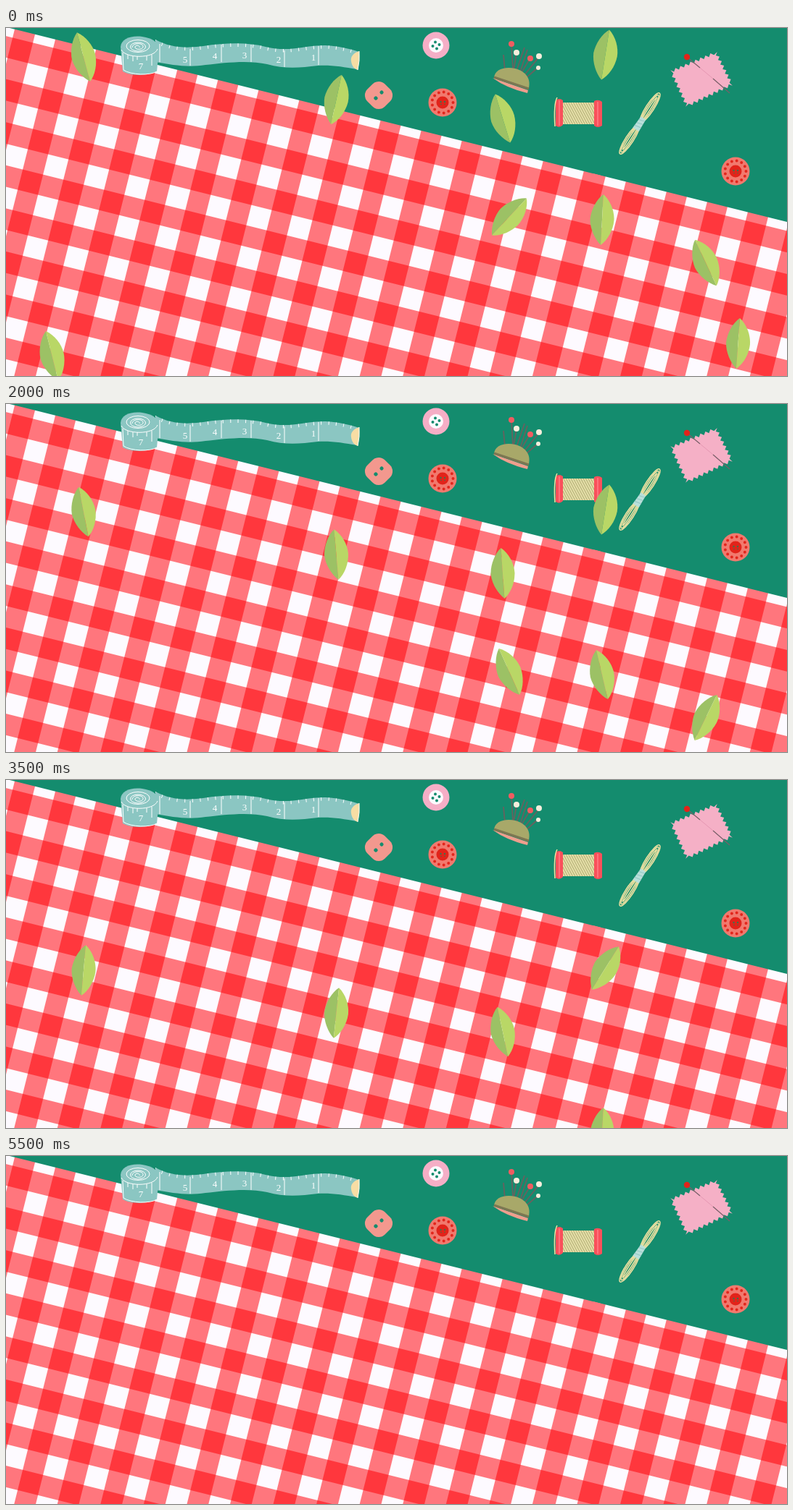
Write an HTML page that moves like this. It is 1077x481 px and loops after 6500 ms.

```html
<!DOCTYPE html>
<html lang="en">
<head>
<meta charset="utf-8">
<title>Sewing table with falling leaves</title>
<style>
  html, body { margin: 0; width: 100%; height: 100%; overflow: hidden; background: #148c6e; }
  svg { display: block; width: 100%; height: 100%; }
  .line { fill: none; stroke: #fff; stroke-width: 1; }
  .numbers { font: 13px "Liberation Serif", "Noto Serif", serif; fill: #fff; text-anchor: middle; }
  .thread { fill: none; stroke: #f3e3a3; stroke-width: 1.5; }
  .needle { fill: none; stroke: #66625f; stroke-width: 1.8; }
</style>
</head>
<body>
<svg viewBox="0 0 1077 481">
  <defs>
    <pattern id="gingham" width="57.78" height="57.78" patternUnits="userSpaceOnUse"
             patternTransform="translate(7.2 12)">
      <rect width="57.78" height="57.78" fill="#ff767d"/>
      <rect width="28.89" height="28.89" fill="#ff373d"/>
      <rect x="28.89" y="28.89" width="28.89" height="28.89" fill="#fdfaff"/>
    </pattern>
    <pattern id="twill" width="3" height="3" patternUnits="userSpaceOnUse" patternTransform="rotate(-28)">
      <rect width="3" height="3" fill="#e6dfa9"/>
      <rect width="1" height="3" fill="#b1ae74"/>
    </pattern>
    <path id="ribbon" d="M206 16C228 28 250 28 272 25C305 20 335 20 358 26C392 34 410 24 440 24C460 25 475 29 487 33L484 57C465 54 450 51 430 52C405 55 385 57 360 50C335 44 300 48 275 51C250 55 230 51 206 47Z"/>
    <clipPath id="ribbonClip"><use href="#ribbon"/></clipPath>
    <g id="leaf">
      <path d="M0-35C-9-28-16-13-16.5 0C-16 13-9 27 0 35Z" fill="#9cc165"/>
      <path d="M0-35C10-27 16.5-13 16.5 0C16 14 9 28 0 35Z" fill="#b9d766"/>
    </g>
    <g id="redButton">
      <circle r="19.5" fill="#f1796e"/>
      <circle r="14.5" fill="none" stroke="#e2261c" stroke-width="4" stroke-linecap="round"
              pathLength="13" stroke-dasharray="0 1"/>
      <circle r="8.5" fill="#e2231a"/>
      <g fill="#39764f">
        <circle cx="-2.5" cy="-1" r="1.2"/><circle cx="3" cy="-1" r="1.2"/>
        <circle cx="-2" cy="2.5" r=".8"/><circle cx="3" cy="2.5" r=".8"/>
      </g>
    </g>
  </defs>

  <rect width="1077" height="481" fill="#148c6e"/>

  <!-- Two widths of cloth joined by a seam -->
  <g transform="translate(5 0) rotate(14.04)" fill="url(#gingham)">
    <rect x="-20" width="860" height="500"/>
    <rect x="828" width="372" height="500" transform="translate(2 0)"/>
  </g>

  <g id="tape">
    <use href="#ribbon" fill="#8bc6c2"/>
    <path d="M206 16C228 28 250 28 272 25C305 20 335 20 358 26C392 34 410 24 440 24C460 25 475 29 487 33"
          clip-path="url(#ribbonClip)" fill="none" stroke="#fff" stroke-width="9" stroke-dasharray="1 9.5"/>
    <path d="M487 32C478 35 475 40 476 46C477 53 480 56 485 58Q488 45 487 32Z" fill="#f7dda4"/>
    <path d="M487 32Q488 45 485 58" class="line"/>
    <path d="M158 26C159 15 172 10 188 12C202 14 210 20 211 28L208 60C194 67 171 66 161 60Z" fill="#8bc6c2"/>
    <g class="line">
      <path d="M159 30C164 42 204 43 209 29M161 34L162 58C172 65 199 66 208 60"/>
      <ellipse cx="182" cy="25" rx="16" ry="8.5"/>
      <ellipse cx="182" cy="26" rx="10.5" ry="6"/>
      <path d="M174 27C174 20 190 20 189 26C188 31 177 30 178 26C179 23 185 24 184 27"/>
      <path d="M168 37V43M175 39V46M181 39V44M194 39V45M201 37V52M212 22V47M254 29V52M297 23V47M338 23V47M384 31V54M431 25V51"/>
    </g>
    <g class="numbers" id="numbers"><text x="186" y="57">7</text></g>
  </g>

  <g transform="translate(593 24)">
    <circle r="18.5" fill="#f5aec6"/>
    <circle r="10" fill="#fdfaff"/>
    <g fill="#148c6e">
      <circle cx="-1" cy="-4.5" r="2"/><circle cx="4.5" cy="-1" r="2"/>
      <circle cx="-4.5" cy="1" r="2"/><circle cx="1" cy="4.5" r="2"/>
    </g>
  </g>
  <g transform="translate(514 93) rotate(45)">
    <rect x="-17" y="-17" width="34" height="34" rx="12" fill="#f3988e"/>
    <g fill="#148c6e"><circle cy="5.7" r="2.6"/><circle cy="-5.7" r="2.6"/></g>
  </g>
  <use href="#redButton" x="602" y="103"/>
  <use href="#redButton" x="1006" y="198"/>

  <g id="cushion">
    <path class="needle" d="M697 23L699 56M704 35L700 58M686 37L688 59M715 27L704 59M719 30L709 61M722 43L709 65M735 40L714 66M733 55L716 70"/>
    <path d="M673 70C673 57 688 53 702 56C717 60 724 70 721 83Q698 76 673 70Z" fill="#a8a869"/>
    <path d="M671 69L720 86L719 90Q690 83 671 69Z" fill="#ee9e8d"/>
    <path d="M673 68L721 84" stroke="#7c7752" stroke-width="3"/>
    <g fill="#f15c61"><circle cx="697" cy="22" r="4"/><circle cx="723" cy="42" r="4"/></g>
    <g fill="#f6eedc"><circle cx="704" cy="34" r="4"/><circle cx="735" cy="39" r="4"/><circle cx="734" cy="55" r="3"/></g>
  </g>

  <g id="spool">
    <rect x="767" y="103" width="46" height="30" fill="url(#twill)"/>
    <path d="M758 100Q763 96 768 100V134Q763 139 758 135ZM811 101Q817 98 822 102V135Q816 139 811 135Z" fill="#f9505b"/>
    <path d="M763 100V135M816 102V135" stroke="#ff717a" stroke-width="2"/>
    <path class="thread" d="M760 96Q755 105 757 136"/>
  </g>

  <g id="skein" transform="translate(874 132) rotate(33)">
    <g class="thread">
      <ellipse cy="-26" rx="5.5" ry="24"/><ellipse cy="-26" rx="3.6" ry="21"/><ellipse cy="-24" rx="1.5" ry="19"/>
      <ellipse cy="26" rx="5.5" ry="24"/><ellipse cy="26" rx="3.6" ry="21"/><ellipse cy="24" rx="1.5" ry="19"/>
    </g>
    <path d="M-4-9L4-9L5 10L-5 10Z" fill="#b9dfda"/>
    <path d="M-4-4L4-6M-4 1L4-1M-5 6L5 4" stroke="#91c8c4"/>
  </g>

  <path id="swatch" fill="#f5b0c6"/>
  <path d="M939 40L957 55M975 70L998 90" stroke="#795f68" stroke-width="1.2"/>
  <path d="M957 55L975 70" stroke="#e597b2" stroke-width="1"/>
  <circle cx="939" cy="40" r="4.2" fill="#e2231a"/>

  <g id="leaves"></g>
</svg>
<script>
  const byId = id => document.getElementById(id);
  const SVG = "http://www.w3.org/2000/svg";
  const add = (parent, name, attrs) => {
    const node = document.createElementNS(SVG, name);
    for (const key in attrs) node.setAttribute(key, attrs[key]);
    return parent.appendChild(node);
  };

  [[247, 48], [288, 43], [329, 42], [376, 48], [424, 45]].forEach(([x, y], i) => {
    add(byId("numbers"), "text", { x, y }).textContent = 5 - i;
  });

  // Fabric swatch with pinked edges
  const corners = [[917, 60], [979, 34], [1001, 78], [939, 108]];
  const outline = [];
  corners.forEach(([x, y], side) => {
    const [nextX, nextY] = corners[(side + 1) % 4];
    const dx = nextX - x, dy = nextY - y, length = Math.hypot(dx, dy);
    const count = side % 2 ? 14 : 18;
    for (let i = 0; i < count; i++) {
      const out = i % 2 ? -2 : 2;
      outline.push([x + dx * i / count + dy / length * out, y + dy * i / count - dx / length * out]);
    }
  });
  byId("swatch").setAttribute("d", "M" + outline.join("L") + "Z");

  // Leaves jump every half second; each step names a pose, halves lie between two poses
  const STEP = 500, LOOP = 6500, END = 5500;
  const steps = [0, 0, 1, 1, 2, 3, 3.5, 4, 4.5, 5];
  const drops = [0, 79, 109, 147, 223, 393];
  const leaves = [
    [107, 40, [-15, -25, -11, 2, 5, 1]],
    [455.5, 99, [12, 28, -5, 16, 6, 1]],
    [685, 125, [-17, 1, -4, -30, -12]],
    [826.5, 37, [9, 9, 9, -15, 32, -34]],
    [694, 261, [43, 31, -24, -2]],
    [822, 265, [3, -8, -13, 12, 3]],
    [965, 324.5, [-25, -13, 26, -2]],
    [1009.5, 436, [4, 4]],
    [63.5, 453, [-14]]
  ].map(([x, y, turns]) => ({ x, y, turns, node: add(byId("leaves"), "use", { href: "#leaf" }) }));

  function draw(now) {
    const time = now % LOOP;
    const pose = steps[Math.min(steps.length - 1, Math.floor(time / STEP))];
    const key = Math.floor(pose);
    const mix = values => values[key] + ((values[key + 1] ?? values[key]) - values[key]) * (pose - key);
    const drop = mix(drops);
    for (const { x, y, turns, node } of leaves) {
      const shown = time < END && key < turns.length;
      node.setAttribute("visibility", shown ? "visible" : "hidden");
      if (shown) node.setAttribute("transform", `translate(${x} ${y + drop}) rotate(${mix(turns)})`);
    }
  }

  const start = performance.now();
  const frame = () => {
    draw(performance.now() - start);
    requestAnimationFrame(frame);
  };
  frame();
</script>
</body>
</html>
```
